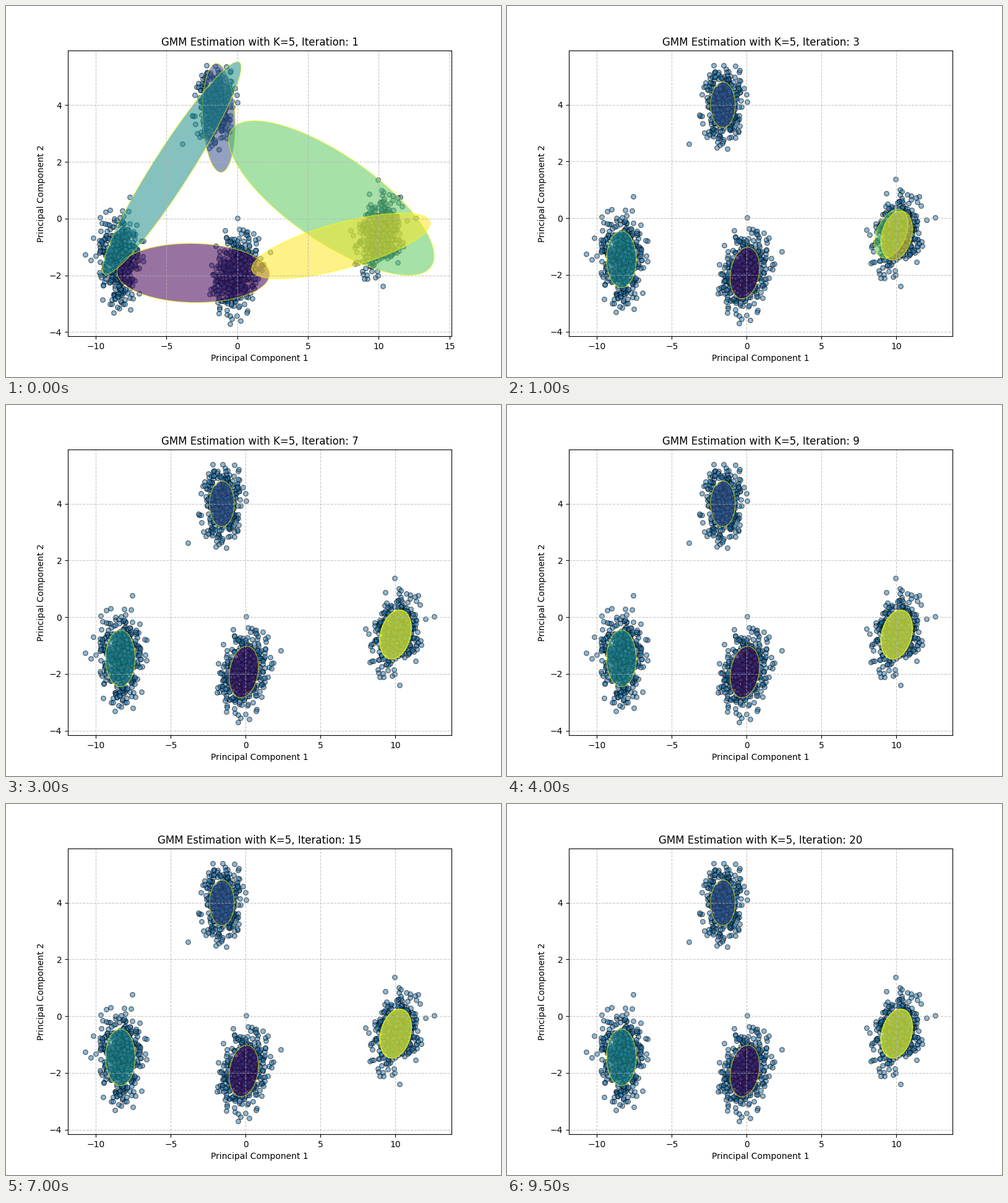
A matplotlib script for the animation above (10000 ms loop, 800 by 600 pixels).

```python
import numpy as np
import matplotlib.pyplot as plt
from matplotlib.animation import FuncAnimation
from matplotlib.patches import Polygon

plt.rcParams["font.family"] = "DejaVu Sans"
rng = np.random.default_rng(5)

# Gaussians as (centre x, centre y, half width, half height, correlation)
LOWER = (-0.124, -1.932, 0.98, 0.907, 0.2)
UPPER = (-1.59, 4.0, 0.826, 0.807, 0)
LEFT = (-8.37, -1.453, 0.99, 1.0, 0)
RIGHT = (10.02, -0.613, 1.055, 0.866, 0.25)

# The first two fits, components in colour order
FIRST = [
    (-3.103, -1.917, 5.385, 1.042, -0.04), (-1.298, 3.553, 1.158, 1.92, -0.13),
    (-4.62, 1.786, 4.895, 3.75, 0.948), (6.656, 0.728, 7.255, 2.726, -0.75),
    (7.325, -0.962, 6.302, 1.156, 0.69),
]
SECOND = [
    (-1.806, -1.97, 4.678, 0.855, 0.12), (-1.541, 4.022, 0.793, 0.807, -0.07),
    (-8.008, -0.846, 2.467, 1.99, 0.85), (9.132, -0.159, 3.368, 1.01, 0.57),
    (10.01, -0.624, 1.19, 0.862, 0.22),
]
THIRD_GREEN = (9.65, -0.547, 1.12, 0.86, 0.4)

# Lone points at the rim of the clusters
STRAYS = [(-3.86, 2.63), (-7.58, 0.77), (-10.72, -1.26), (0.02, 0.03),
          (2.33, -1.17), (9.94, 1.38), (12.58, 0.03), (10.27, -2.39)]


def shape(unit, gaussian):
    """Map points around the unit circle onto a correlated ellipse."""
    cx, cy, a, b, rho = gaussian
    u, v = unit
    return np.column_stack([cx + a * u, cy + b * (rho * u + np.sqrt(1 - rho**2) * v)])


def cluster(gaussian, count=490, reach=2.9):
    unit = rng.standard_normal((2, count))
    unit = unit[:, np.hypot(*unit) < reach]
    # the drawn ellipses span sqrt(2) standard deviations
    return shape(unit / np.sqrt(2), gaussian)


def components(i):
    if i < 2:
        return (FIRST, SECOND)[i]
    green = np.array(RIGHT) + np.subtract(THIRD_GREEN, RIGHT) * 0.5 ** (i - 2)
    return [LOWER, UPPER, LEFT, green, RIGHT]


points = np.vstack([cluster(g) for g in (UPPER, LEFT, LOWER, RIGHT)] + [STRAYS])
rng.shuffle(points)
angle = np.linspace(0, 2 * np.pi, 240, endpoint=False)
circle = np.cos(angle), np.sin(angle)

fig, ax = plt.subplots(figsize=(8, 6), dpi=100)
ax.scatter(*points.T, s=30, alpha=0.5, edgecolors="k")
ellipses = [
    ax.add_patch(Polygon(shape(circle, g), facecolor=color, edgecolor="yellow", alpha=0.55))
    for g, color in zip(FIRST, plt.cm.viridis(np.linspace(0, 1, 5)))
]
ax.set_xlabel("Principal Component 1")
ax.set_ylabel("Principal Component 2")
ax.grid(True, linestyle="--", alpha=0.7)


def update(i):
    ax.set_title(f"GMM Estimation with K=5, Iteration: {i + 1}")
    # the wide first fit stretches the view
    if i == 0:
        ax.set(xlim=(-11.96, 15.135), ylim=(-4.146, 5.930))
    else:
        ax.set(xlim=(-11.875, 13.745), ylim=(-4.1625, 5.9138))
    for ellipse, gaussian in zip(ellipses, components(i)):
        ellipse.set_xy(shape(circle, gaussian))
    return ellipses


anim = FuncAnimation(fig, update, frames=20, interval=500, repeat=True, repeat_delay=0)
plt.show()
```
